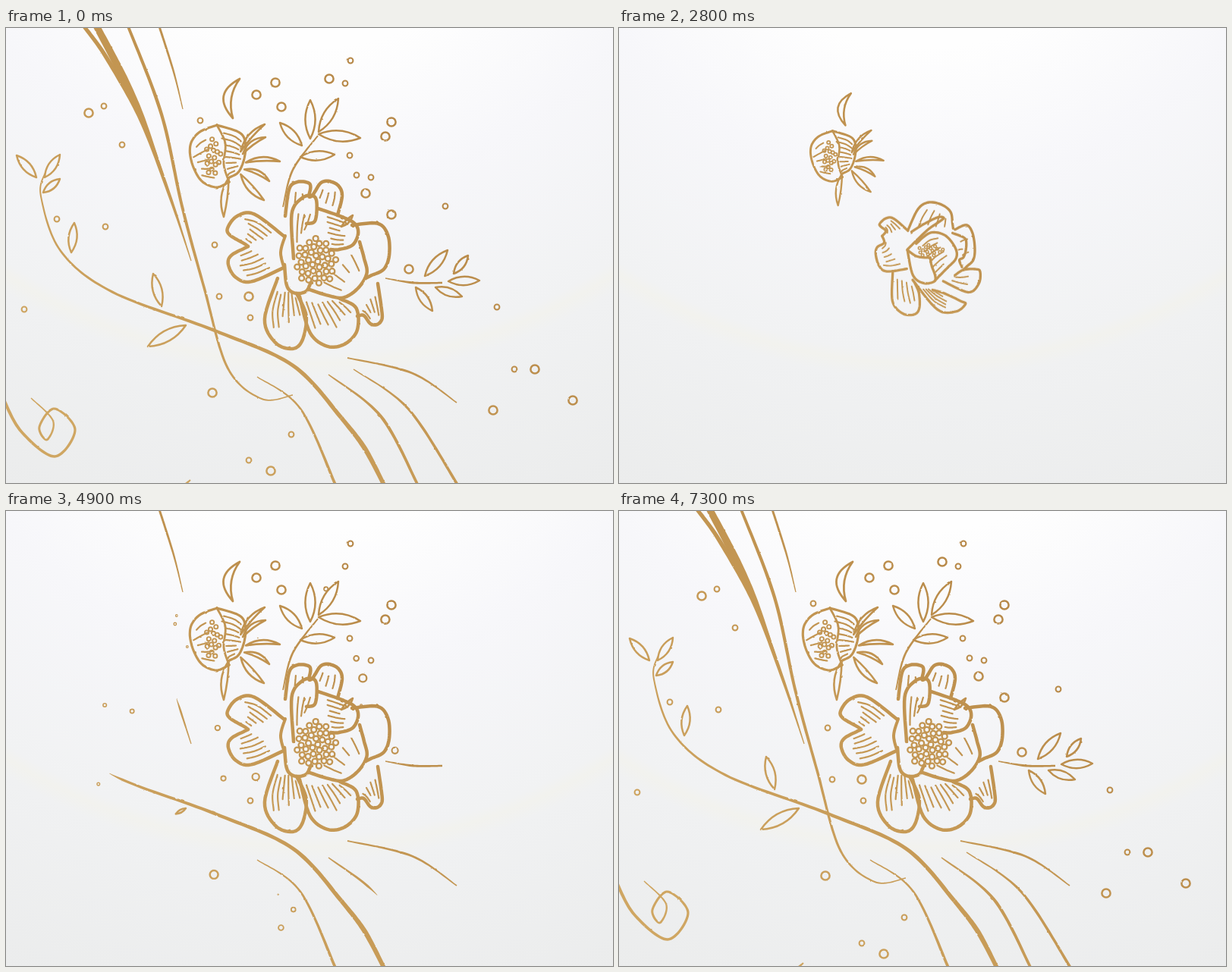
Recreate the animation shown at these times as an HTML page. Size 800 by 600 pixels, loop 9100 ms.

```html
<!DOCTYPE html>
<html lang="en">
<head>
<meta charset="utf-8">
<title>Golden flowers</title>
<style>
  html, body { margin: 0; width: 100%; height: 100%; overflow: hidden; background: #f3f4f5; }
  svg { display: block; width: 100vw; height: 100vh; }
  .line { fill: none; stroke: url(#gold); stroke-linecap: round; stroke-linejoin: round;
          stroke-width: calc(var(--w) * var(--k, 1) * 1px); }
  .ink { fill: url(#gold); }
</style>
</head>
<body>
<svg viewBox="0 0 800 600" preserveAspectRatio="none">
  <defs>
    <radialGradient id="paper" gradientUnits="userSpaceOnUse" cx="400" cy="-300" r="990">
      <stop offset=".33" stop-color="#fefefe"/>
      <stop offset=".51" stop-color="#f7f7fa"/>
      <stop offset=".735" stop-color="#f1f2f3"/>
      <stop offset=".75" stop-color="#f2f2ee"/>
      <stop offset=".77" stop-color="#f0f1f2"/>
      <stop offset="1" stop-color="#ebecec"/>
    </radialGradient>
    <linearGradient id="gold" gradientUnits="userSpaceOnUse" x1="200" y1="600" x2="660" y2="150">
      <stop offset="0" stop-color="#cfa662"/>
      <stop offset=".5" stop-color="#c49753"/>
      <stop offset="1" stop-color="#b28344"/>
    </linearGradient>
    <filter id="rough" filterUnits="userSpaceOnUse" x="0" y="0" width="800" height="600" color-interpolation-filters="sRGB">
      <feTurbulence type="fractalNoise" baseFrequency=".13" numOctaves="2" seed="4"/>
      <feDisplacementMap in="SourceGraphic" scale="1.8" xChannelSelector="R" yChannelSelector="G"/>
      <feGaussianBlur stdDeviation=".4"/>
    </filter>
  </defs>
  <rect width="800" height="600" fill="url(#paper)"/>
  <g id="art" filter="url(#rough)"></g>
</svg>
<script>
const art = document.getElementById('art');
const movers = [];
const clamp = (v) => Math.max(0, Math.min(1, v));
const mix = (a, b, k) => a + (b - a) * k;
const mixPt = (a, b, k) => [mix(a[0], b[0], k), mix(a[1], b[1], k)];
const span = (p, from, to) => clamp((p - from) / (to - from));
const easeOut = (k) => 1 - (1 - k) ** 2;
const points = (text) => text.split(' ').map((s) => s.split(',').map(Number));

let seed = 7;
const random = () => (seed = seed * 16807 % 2147483647) / 2147483647;

function add(parent, tag, attrs = {}) {
  const node = document.createElementNS('http://www.w3.org/2000/svg', tag);
  for (const name in attrs) node.setAttribute(name, attrs[name]);
  return parent.appendChild(node);
}
const line = (parent, d, w) => add(parent, 'path', { class: 'line', d, style: `--w:${w}` });
const ring = (parent, cx, cy, r, w) => add(parent, 'circle', { class: 'line', cx, cy, r, style: `--w:${w}` });

// Catmull-Rom samples through key points
function spline(pts, steps = 8) {
  const out = [];
  for (let i = 0; i < pts.length - 1; i++) {
    const [a, b, c, d] = [pts[i - 1] || pts[i], pts[i], pts[i + 1], pts[i + 2] || pts[i + 1]];
    for (let j = 0; j < steps; j++) {
      const t = j / steps;
      out.push([0, 1].map((n) => b[n] + 0.5 * t * (c[n] - a[n] +
        t * (2 * a[n] - 5 * b[n] + 4 * c[n] - d[n] + t * (3 * (b[n] - c[n]) + d[n] - a[n])))));
    }
  }
  out.push(pts[pts.length - 1]);
  return out;
}
const toPath = (pts) => 'M' + pts.map(([x, y]) => x.toFixed(1) + ',' + y.toFixed(1)).join('L');
const curve = (parent, text, w) => line(parent, toPath(spline(points(text))), w);

// Petal on base a-b: wa and wb are its half widths, veins run between heights lo and hi
function petal(parent, w, [ax, ay, bx, by, tx, ty, wa, wb, veins], lo = 0.08, hi = 0.7) {
  const a = [ax, ay], b = [bx, by], tip = [tx, ty], mid = mixPt(a, b, 0.5);
  const len = Math.hypot(tx - mid[0], ty - mid[1]);
  const n = [(mid[1] - ty) / len, (tx - mid[0]) / len];
  const at = (h, off) => mixPt(mid, tip, h).map((v, i) => v + n[i] * off);
  const edge = (base, off) => [base, at(0.5, off), at(0.88, off * 0.65)];
  const ea = edge(a, wa), eb = edge(b, -wb);
  line(parent, toPath(spline([...ea, tip, ...eb.reverse()])), w);
  eb.reverse();
  const along = (e, h) => h < 0.5 ? mixPt(e[0], e[1], h / 0.5) : mixPt(e[1], e[2], (h - 0.5) / 0.38);
  for (let i = 1; i <= veins; i++) {
    const f = i / (veins + 1), from = lo + 0.1 * random(), to = hi - 0.25 * random();
    const pts = [from, (from + to) / 2, to].map((h) => mixPt(along(ea, h), along(eb, h), f));
    line(parent, toPath(spline(pts)), 2.2);
  }
}

// Almond or crescent: a and b bow the two sides
function leafPath([bx, by], [tx, ty], a, b) {
  const dx = tx - bx, dy = ty - by, len = Math.hypot(dx, dy) || 1;
  const side = (n) => `${(bx + tx) / 2 - dy / len * n},${(by + ty) / 2 + dx / len * n}`;
  return `M${bx},${by}Q${side(a)} ${tx},${ty}Q${side(-b)} ${bx},${by}Z`;
}

// Tapered stroke that grows from its first point
function brush(from, to, widths, text) {
  const pts = spline(points(text), 16), last = pts.length - 1, at = [0];
  const node = add(art, 'path', { class: 'ink' });
  for (let i = 1; i <= last; i++) {
    at.push(at[i - 1] + Math.hypot(pts[i][0] - pts[i - 1][0], pts[i][1] - pts[i - 1][1]));
  }
  const total = at[last];
  const width = (u) => {
    const f = u * (widths.length - 1), i = Math.min(Math.floor(f), widths.length - 2);
    return mix(widths[i], widths[i + 1], f - i);
  };
  movers.push((p) => {
    const cut = total * span(p, from, to), left = [], right = [];
    for (let i = 0; cut && i <= last && (!i || at[i - 1] < cut); i++) {
      const a = pts[Math.max(0, i - 1)], b = pts[Math.min(last, i + 1)];
      const s = Math.min(at[i], cut);
      const [x, y] = i ? mixPt(a, pts[i], (s - at[i - 1]) / (at[i] - at[i - 1])) : pts[0];
      const taper = cut < total ? 0.6 + (cut - s) * 0.15 : Infinity;
      const k = Math.min(width(s / total), taper) / 2 / Math.hypot(b[0] - a[0], b[1] - a[1]);
      const nx = (a[1] - b[1]) * k, ny = (b[0] - a[0]) * k;
      left.push([x + nx, y + ny]);
      right.unshift([x - nx, y - ny]);
    }
    node.setAttribute('d', cut ? toPath(left.concat(right)) + 'Z' : '');
  });
}

// Leaves given as base and tip pairs, opening one after another
function spray(from, step, text) {
  const pts = points(text);
  for (let i = 0; i < pts.length; i += 2) {
    const node = line(art, '', 2.5), base = pts[i], tip = pts[i + 1], start = from + step * i / 2;
    const w = 4 + 0.18 * Math.hypot(tip[0] - base[0], tip[1] - base[1]);
    movers.push((p) => {
      const k = easeOut(span(p, start, start + 350));
      node.setAttribute('d', k ? leafPath(base, mixPt(base, tip, k), w * k, w * k) : '');
    });
  }
}

// Rings, small and large in turn, drift out of the flower on a slight curve
function bubbles(from, step, time, text) {
  points(text).forEach(([x, y], i) => {
    const r = i % 2 ? 5.6 : 3.4, start = from + i * step;
    const node = ring(art, x, y, 0, 1.3 + r * 0.22);
    movers.push((p) => {
      const k = easeOut(span(p, start, start + time));
      node.setAttribute('cx', mix(411, x, mix(0.45, 1, k)));
      node.setAttribute('cy', mix(292, y, mix(0.7, 1, k)));
      node.setAttribute('r', r * k);
      node.style.setProperty('--k', 0.3 + 0.7 * k);
      node.style.display = k ? '' : 'none';
    });
  });
}

function stamens(parent, n, cx, cy, rx, ry, r, w) {
  for (let i = 0; i < n; i++) {
    const a = i * 2.39996, d = Math.sqrt((i + 0.4) / n);
    ring(parent, cx + rx * d * Math.cos(a), cy + ry * d * Math.sin(a), r, w);
  }
}

function buildBud() {
  const g = add(art, 'g');
  petal(g, 3.2, [278, 128, 294, 203, 245, 178, 36, 40, 5], 0.4, 0.95);
  petal(g, 3.2, [294, 203, 278, 128, 314, 172, 30, 32, 8], 0.05, 0.85);
  curve(g, '278,128 289,152 287,180 294,203', 2.8);
  stamens(g, 16, 273, 171, 11, 25, 2.6, 1.9);
  points('341,127 342,144 361,176 347,202 340,227 287,249').forEach((tip, i) => {
    const away = Math.hypot(tip[0] - 296, tip[1] - 178);
    line(g, leafPath(mixPt([296, 178], tip, 20 / away), tip, i < 4 ? -13 : 13, 3), 2.6);
  });
  line(g, leafPath([299, 119], [308, 67], -34, 13), 2.8);
  return g;
}

function buildClosed() {
  const g = add(art, 'g');
  [
    [372, 260, 328, 269, 324, 248, 20, 5, 4], [328, 269, 370, 325, 317, 300, 18, 31, 5],
    [449, 256, 372, 259, 428, 215, 31, 33, 4], [371, 292, 378, 262, 433, 238, 2, 10, 0],
    [418, 345, 386, 282, 453, 290, 25, 42, 6], [371, 293, 410, 306, 416, 347, 26, 10, 0],
    [466, 327, 452, 258, 486, 292, 28, 42, 2], [464, 322, 448, 264, 470, 296, 16, 23, 1],
    [432, 346, 452, 336, 495, 330, 30, 9, 2], [380, 344, 414, 361, 470, 385, 28, 2, 4],
    [346, 332, 384, 350, 382, 403, 29, 18, 4]
  ].forEach((row) => petal(g, 3.8, row));
  curve(g, '371,293 388,304 410,306', 3.8);
  stamens(g, 16, 410, 294, 24, 10, 2.3, 1.7);
  return g;
}

function buildOpen() {
  const g = add(art, 'g');
  [
    [367, 275, 319, 288, 292, 264, 29, 12, 5], [319, 288, 366, 316, 293, 312, 17, 28, 5],
    [358, 330, 383, 350, 377, 423, 33, 22, 6], [387, 354, 440, 357, 446, 417, 33, 36, 7],
    [463, 380, 490, 337, 489, 391, 12, 13, 4], [474, 330, 456, 260, 505, 300, 29, 40, 0],
    [404, 221, 368, 248, 398, 204, 8, 20, 2], [437, 247, 404, 221, 426, 202, 20, 16, 3],
    [396, 258, 379, 304, 404, 221, 12, 20, 3], [428, 292, 411, 238, 464, 272, 24, 19, 6],
    [400, 345, 466, 282, 464, 343, 34, 34, 4], [367, 312, 403, 336, 386, 350, 16, 16, 0]
  ].forEach((row) => petal(g, 4.5, row));
  curve(g, '368,274 362,296 367,318', 4);
  line(g, leafPath([442, 262], [457, 247], 6, 3), 2.6);
  stamens(g, 38, 408, 308, 28, 31, 3.5, 2.3);
  return g;
}

function place(g, cx, cy, s, k) {
  g.style.display = s > 0 ? '' : 'none';
  g.setAttribute('transform', `translate(${cx} ${cy}) scale(${s}) translate(${-cx} ${-cy})`);
  g.style.setProperty('--k', k);
}

function buildFlowers() {
  const bud = buildBud(), closed = buildClosed(), open = buildOpen();
  const dots = [[296, 169, 4], [411, 292, 4.5]].map(([cx, cy, r]) => add(art, 'circle', { class: 'ink', cx, cy, r }));
  movers.push((p) => {
    const grow = easeOut(span(p, 2250, 3300)), settle = span(p, 3300, 3700);
    const weight = grow ? 1 / Math.sqrt(grow) : 1;
    place(bud, 296, 169, grow * mix(1.05, 1, settle), weight);
    place(closed, 411, 292, p < 3400 ? grow : 0, weight);
    place(open, 411, 292, p < 3400 ? 0 : mix(0.9, 1, settle), 1);
    dots.forEach((d) => { d.style.display = p < 2320 ? '' : 'none'; });
  });
}

function buildStems() {
  // Long vine, sprouting both ways from a small tick
  brush(3600, 3800, [0.4, 0.8], '442,513 451,525');
  brush(4250, 4700, [5.5, 6.5, 5.5], '442,514 472,553 498,602');
  brush(4250, 5250, [5.5, 5, 4.4, 3.6, 3, 2.6, 1.8], '442,514 378,445 275,399 140,348 72,294 46,222 51,192');
  // Tall stems
  brush(3830, 4110, [1.2, 2.6, 3], '233,107 221,58 202,-2');
  brush(4700, 5800, [1.2, 4, 5.5, 6, 5], '244,307 216,222 178,121 133,40 103,-2');
  brush(5330, 6300, [1, 6, 10, 9], '211,205 178,115 148,52 119,-3');
  brush(5000, 6700, [1.4, 3, 3.6, 4, 4.4, 3.8], '378,484 337,489 292,448 261,342 232,235 205,114 161,-2');
  // Sweeps below the flower
  brush(3800, 4750, [1.8, 3, 1.6], '450,435 535,455 594,494');
  brush(4000, 4750, [1.4, 3, 3.8], '331,460 388,502 434,602');
  brush(4600, 5300, [1.6, 4, 3.6], '425,457 494,512 542,601');
  brush(5350, 6600, [1.4, 3.4, 3.6], '458,450 530,502 595,602');
  // Flower stalks
  brush(3960, 4280, [1.8, 2.8, 2], '365,236 378,187 411,142');
  brush(3220, 3700, [1.5, 3, 2.4], '500,330 537,336 575,336');
  // Scroll
  brush(6250, 7300, [4.2, 3.6, 3.2, 3, 1.4], '-4,488 20,532 64,565 91,530 64,502 44,526 54,543 62,518 33,488');
  brush(6800, 7000, [2, 3], '243,596 236,602');
}

function buildLeaves() {
  spray(4180, 75, '388,170 433,167 390,155 361,125 401,146 401,95 412,137 438,93 412,140 467,145');
  spray(4850, 100, '237,392 187,420 205,367 194,324 86,296 90,257 49,217 71,199 51,197 71,167 40,197 14,168');
  spray(4900, 180, '552,327 582,293 590,324 609,300 566,342 601,354 540,342 562,373 583,334 624,333');
}

function buildBubbles() {
  bubbles(3780, 45, 750, '453,168 363,104 322,382 355,72 481,197 330,88 447,73 508,124 454,43 500,143 462,194 272,481 275,286');
  bubbles(4250, 45, 900, '281,354 474,218 376,536 320,354 131,262 531,318 67,252 349,584 24,371 426,67 153,154 109,112 320,570');
  bubbles(4600, 110, 1400, '129,103 508,246 256,122 642,504 579,235 697,450 647,368 747,491 670,450');
}

buildStems();
buildLeaves();
buildFlowers();
buildBubbles();

// The drawing rewinds quickly, then grows again at its own pace
function progress(ms) {
  const t = Math.max(300, Math.min(7300, Math.floor(ms / 100) * 100));
  if (t < 1400) return mix(7300, 3950, span(t, 300, 1400));
  if (t < 2200) return mix(3950, 2200, span(t, 1400, 2100));
  return t;
}

const begin = performance.now();
let shown;
function draw() {
  const p = progress((performance.now() - begin) % 9100);
  if (p !== shown) movers.forEach((move) => move(p));
  shown = p;
  requestAnimationFrame(draw);
}
draw();
</script>
</body>
</html>
```
